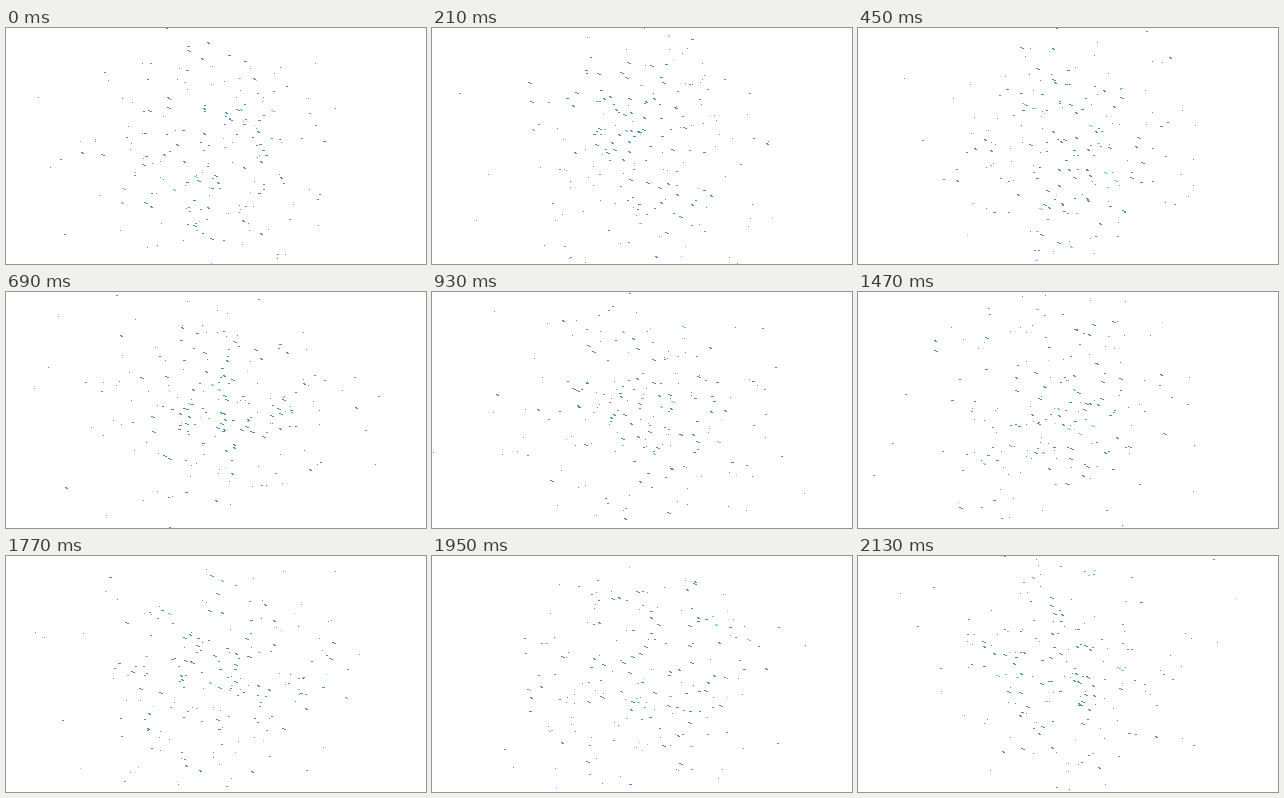
Animation, 420 px wide and 236 px high, one loop 2.16 s. Source, as an HTML page with a canvas:

```html
<!DOCTYPE html>
<html lang="en">
<head>
<meta charset="utf-8">
<title>Scattered particles</title>
<style>
  html, body { margin: 0; width: 100%; height: 100%; overflow: hidden; background: #fff; }
  canvas { display: block; width: 420px; height: 236px; }
</style>
</head>
<body>
<canvas id="stage" width="420" height="236"></canvas>
<script>
const W = 420, H = 236, STEP = 30, STEPS = 72, COUNT = 205;
const ctx = document.getElementById('stage').getContext('2d');

function seeded(seed) {
  let s = seed >>> 0;
  return () => {
    s = (s + 0x6D2B79F5) >>> 0;
    let n = Math.imul(s ^ (s >>> 15), 1 | s);
    n = (n + Math.imul(n ^ (n >>> 7), 61 | n)) ^ n;
    return ((n ^ (n >>> 14)) >>> 0) / 4294967296;
  };
}

function dot(x, y, w, color) {
  ctx.fillStyle = color;
  ctx.fillRect(x, y, w, 1);
}

// Sizes shrink away from the middle; the widest dots lean down to the right.
function particle(rand) {
  const r = Math.sqrt(-2 * Math.log(1 - rand()));
  const a = rand() * Math.PI * 2;
  const x = Math.round(206 + 60 * r * Math.cos(a));
  const y = Math.round(118 + 60 * r * Math.sin(a));
  const big = rand() < 0.7 * Math.exp(-r * r / 3.6);
  const tint = rand();
  const shape = rand();

  if (!big) {
    const color = tint < 0.1 ? '#7cc4ec' : tint < 0.45 ? '#5f95c4' : '#7d8494';
    dot(x, y, shape < 0.25 ? 2 : 1, color);
    return;
  }
  const color = tint < 0.1 ? '#74c0ee' : tint < 0.8 ? '#4a8dc6' : '#6c86a2';
  if (shape < 0.5) {
    dot(x, y, shape < 0.3 ? 2 : 3, color);
  } else {
    dot(x - 1, y, 2, color);
    dot(x + (shape < 0.75 ? 1 : 0), y + 1, 2, color);
  }
}

function draw(step) {
  const rand = seeded(step * 7919 + 41);
  ctx.fillStyle = '#fff';
  ctx.fillRect(0, 0, W, H);
  for (let i = 0; i < COUNT; i++) particle(rand);
}

const start = performance.now();
let shown = -1;

function tick() {
  const step = Math.floor((performance.now() - start) / STEP) % STEPS;
  if (step !== shown) draw(shown = step);
  requestAnimationFrame(tick);
}
tick();
</script>
</body>
</html>
```
